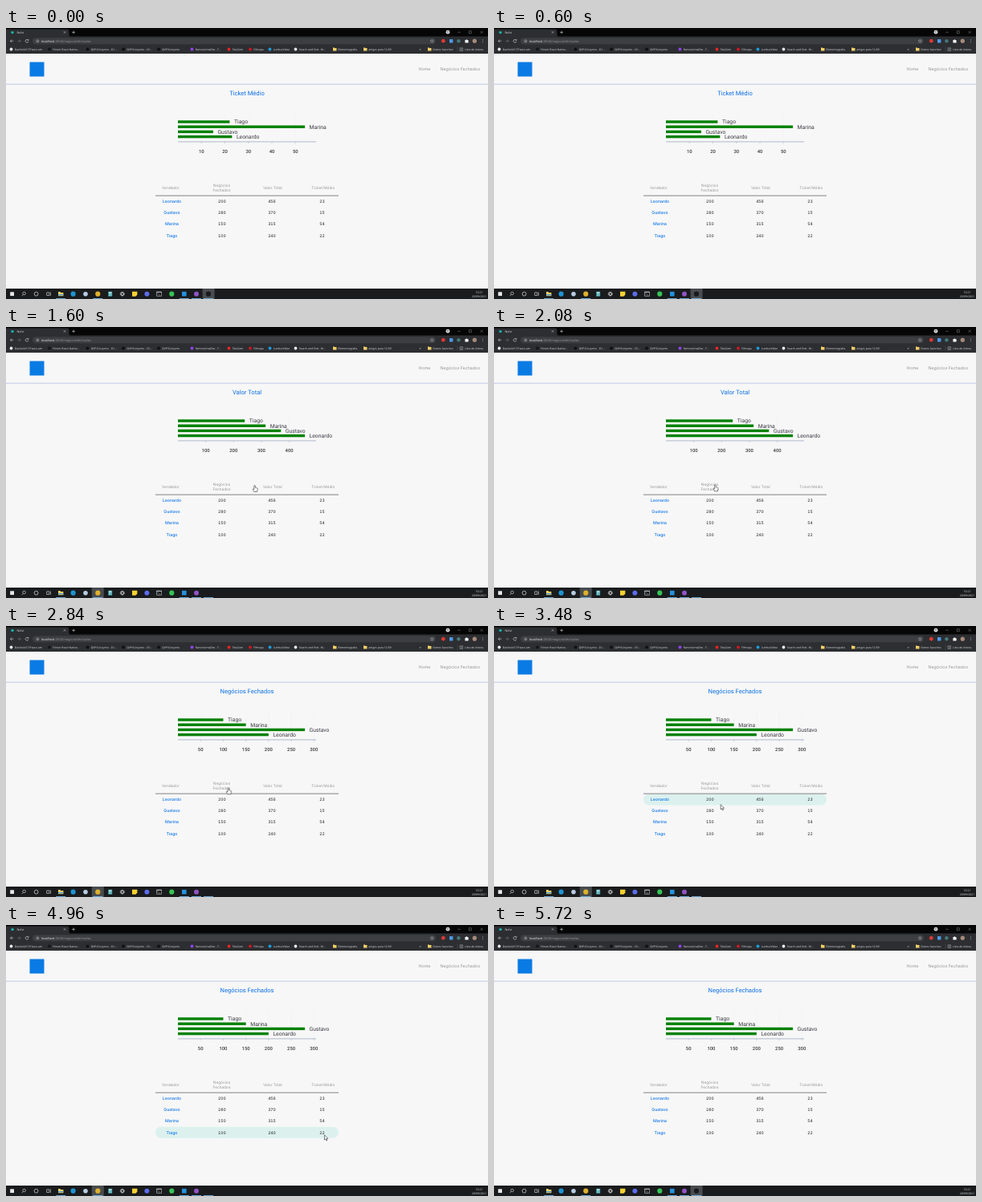
Write an HTML page that moves like this. It is 600x338 px and loops after 5760 ms.

```html
<!DOCTYPE html>
<html lang="pt-BR">
<head>
<meta charset="utf-8">
<title>Ticket Médio</title>
<style>
html, body { margin: 0; width: 100%; height: 100%; overflow: hidden; background: #f7f7f7; }
svg { display: block; width: 100vw; height: 100vh; }
text { text-rendering: geometricPrecision; }
.ui { font-family: "Open Sans", "Noto Sans", sans-serif; }
.page { font-family: Inter, Roboto, sans-serif; font-variant-numeric: tabular-nums; }
.plot { font-family: Roboto, "Open Sans", sans-serif; }
</style>
</head>
<body>
<svg id="stage" viewBox="0 0 600 338" preserveAspectRatio="none"></svg>
<script>
const LOOP = 5760;
const stage = document.getElementById("stage");

function el(parent, tag, attrs, content) {
  const node = document.createElementNS("http://www.w3.org/2000/svg", tag);
  for (const key in attrs) node.setAttribute(key, attrs[key]);
  if (content !== undefined) node.textContent = content;
  parent.appendChild(node);
  return node;
}
const group = (name, parent = stage) => el(parent, "g", { class: name });
const rect = (g, x, y, width, height, fill, rx = 0) => el(g, "rect", { x, y, width, height, fill, rx });
const dot = (g, cx, cy, r, fill) => el(g, "circle", { cx, cy, r, fill });
const line = (g, d, stroke, w = 0.7) => el(g, "path", { d, stroke, "stroke-width": w, fill: "none" });
const shape = (g, d, fill) => el(g, "path", { d, fill });
const label = (g, x, y, size, fill, str, anchor = "start", weight = 400) =>
  el(g, "text", { x, y, "font-size": size, fill, "text-anchor": anchor, "font-weight": weight }, str);
const show = (node, on) => node.setAttribute("visibility", on ? "visible" : "hidden");

const sellers = [
  { name: "Leonardo", deals: 200, total: 456, ticket: 23 },
  { name: "Gustavo", deals: 280, total: 370, ticket: 15 },
  { name: "Marina", deals: 150, total: 315, ticket: 54 },
  { name: "Tiago", deals: 100, total: 240, ticket: 22 }
];
const ROW_TOP = 209.4, ROW_H = 14.1, TABLE_L = 186, TABLE_R = 414;

function drawBrowser() {
  const g = group("ui");
  const pale = "#d6d7da";
  rect(g, 0, 0, 600, 11, "#060607");
  shape(g, "M0 11V1.6H76Q78.5 1.6 78.5 4V9Q78.5 10.5 80.5 11Z", "#2d2e31");
  rect(g, 0, 10.5, 600, 21.8, "#2d2e31");
  dot(g, 8, 5.6, 1.7, "#17b8b0");
  label(g, 13.5, 6.9, 3.7, "#e4e5e7", "Nolvi");
  line(g, "M71.8 4.2l2.4 2.4m0-2.4l-2.4 2.4", pale, 0.5);
  line(g, "M82.2 5.4h3.8m-1.9-1.9v3.8", pale, 0.6);
  dot(g, 550, 5.2, 2.4, "#dfe0e2");
  shape(g, "M548.9 4.5h2.2l-1.1 1.5z", "#222");
  line(g, "M562.3 5.3h3.4M576.3 3.7h3v3h-3zM590.5 3.7l3.2 3.2m0-3.2l-3.2 3.2", "#8c8e91", 0.5);

  line(g, "M9.3 16.2H5.4m1.8-1.8l-1.8 1.8 1.8 1.8", pale, 0.6);
  line(g, "M14.3 16.2h3.9m-1.8-1.8l1.8 1.8-1.8 1.8", "#777a7f", 0.6);
  line(g, "M27.5 15a1.9 1.9 0 1 0 .4 1.7m.1-2.8v1.4h-1.4", pale, 0.6);
  rect(g, 33, 12.3, 502, 8, "#3d3e41", 4);
  el(g, "circle", { cx: 39.3, cy: 16.3, r: 1.5, fill: "none", stroke: pale, "stroke-width": 0.5 });
  line(g, "M39.3 16v1.2", pale, 0.5);
  const url = label(g, 44, 17.7, 4, "#94979b", "");
  el(url, "tspan", { fill: "#f1f1f2" }, "localhost");
  el(url, "tspan", {}, ":3000/negociosfechados");
  line(g, "M530.3 14.2l.6 1.4 1.5.1-1.1 1 .3 1.5-1.3-.8-1.3.8.3-1.5-1.1-1 1.5-.1z", pale, 0.4);
  dot(g, 544.3, 16.2, 2.4, "#d83a35");
  rect(g, 552, 14, 4.4, 4.4, "#4c9ae8", 0.5);
  dot(g, 563.4, 16.2, 2.2, "#44797d");
  shape(g, "M571.4 15h1.2a.8.8 0 0 1 1.6 0h1.2v1.2a.8.8 0 0 1 0 1.5v.9h-4z", "#f3f3f4");
  dot(g, 583.3, 16.2, 2.6, "#a78b7d");
  for (const y of [14.5, 16.2, 17.9]) dot(g, 593.3, y, 0.45, pale);

  const event = "QVP/Conjunto";
  const bookmarks = [
    [6.5, "#e8e8e8", "Danilo4417/Passo-um"],
    [54, "#15181b", "Fórum React Native..."],
    [101.5, "#111", event + " - O l..."], [146, "#111", event + " - O l..."], [190, "#111", event],
    [231.5, "#8d45f2", "RamonLimaDev - T..."],
    [277.5, "#f02424", "TelaZum"],
    [304, "#d01820", "Filmopa"],
    [328.5, "#1b9de0", "Lumba Video"],
    [360.5, "#e9e9e9", "Search and find - M..."],
    [409, "folder", "Eletromiografia"],
    [447, "folder", "artigos para 12/09"],
    [527, "folder", "Outros favoritos"]
  ];
  for (const [x, color, str] of bookmarks) {
    if (color === "folder") shape(g, `M${x - 2} 24.4h1.7l.6.7h2.2v3.5h-4.5z`, "#f0cf68");
    else dot(g, x, 26.5, 1.9, color);
    label(g, x + 4.2, 27.7, 3.35, "#e2e3e5", str);
  }
  label(g, 514.5, 27.8, 4.5, pale, "»");
  line(g, "M522.6 23.8v5.6M562 23.8v5.6", "#55575b", 0.4);
  line(g, "M565 24.8h3.6v3.6h-3.6zM566 26h1.7m-1.7 1.2h1.7", pale, 0.4);
  label(g, 571.2, 27.7, 3.35, "#e2e3e5", "Lista de leitura");
}

function drawPage() {
  const g = group("page");
  rect(g, 0, 32, 600, 293, "#f7f7f7");
  rect(g, 0, 69.7, 600, 0.8, "#b3bde2");
  rect(g, 29.5, 42.5, 18, 18, "#0a7be4");
  label(g, 513.6, 53, 5.3, "#969699", "Home");
  label(g, 590, 53, 5.3, "#969699", "Negócios Fechados", "end");
}

// One chart per column, bars listed from the last seller to the first.
function drawChart(title, key, step) {
  const g = group("plot");
  const left = 214;
  const scale = 158 / Math.max(...sellers.map(s => s[key]));
  label(g, 300, 83.8, 7.6, "#0c70e4", title, "middle");
  for (let v = step; v * scale < 172; v += step) {
    const x = left + v * scale;
    line(g, `M${x} 107V142`, "#f1f1f3", 0.5);
    line(g, `M${x} 142v2.2`, "#a9b2c4", 0.5);
    label(g, x, 155.5, 5.9, "#3e3e44", v, "middle", 500);
  }
  line(g, "M214 141.9H386", "#9ca9bf", 0.8);
  [...sellers].reverse().forEach((s, i) => {
    const y = 117 + i * 6.2, w = s[key] * scale;
    rect(g, left, y - 1.7, w, 3.4, "green");
    label(g, left + w + 5.6, y + 2.4, 6.8, "#3a3a44", s.name);
  });
  return g;
}

function drawTable() {
  const g = group("page");
  const hover = rect(g, TABLE_L, 0, TABLE_R - TABLE_L, ROW_H, "#dcf1ed", 7);
  const head = (x, y, str) => label(g, x, y, 4.75, "#98989b", str, "middle");
  head(205, 200.8, "Vendedor");
  head(268.5, 197.6, "Negócios");
  head(268.5, 204.3, "Fechados");
  head(331.8, 200.8, "Valor Total");
  head(394.8, 200.8, "Ticket Médio");
  rect(g, TABLE_L, 208.7, TABLE_R - TABLE_L, 0.8, "#66666a");
  sellers.forEach((s, i) => {
    const y = 218.2 + i * ROW_H;
    label(g, 206.5, y, 5.2, "#0d75ea", s.name, "middle", 500);
    label(g, 268.8, y, 5, "#3b3b3f", s.deals, "middle", 500);
    label(g, 331, y, 5, "#3b3b3f", s.total, "middle", 500);
    label(g, 393.4, y, 5, "#3b3b3f", s.ticket, "middle", 500);
  });
  return hover;
}

function drawTaskbar() {
  const g = group("ui");
  const pale = "#e8e9ea";
  rect(g, 0, 325, 600, 13, "#191b1d");
  const focus = rect(g, 0, 325, 15, 13, "#484c4f");
  rect(g, 5.2, 329.3, 4.8, 4.8, pale);
  el(g, "circle", { cx: 22.6, cy: 331, r: 1.8, fill: "none", stroke: pale, "stroke-width": 0.6 });
  line(g, "M21.3 332.4l-1.7 1.8", pale, 0.6);
  el(g, "circle", { cx: 37.6, cy: 331.7, r: 2.4, fill: "none", stroke: pale, "stroke-width": 0.7 });
  line(g, "M50.7 329.9h3.2v3.6h-3.2zM55.4 329.4v4.6", pale, 0.6);
  shape(g, "M65 329h2.4l.8.9h3.2v4.4H65z", "#f4cf61");
  rect(g, 65, 332, 6.4, 1.4, "#4aa0de");
  dot(g, 83.6, 331.7, 3.1, "#1f93d2");
  dot(g, 99, 331.7, 2.8, "#b9cbe0");
  dot(g, 114.3, 331.7, 3.1, "#dfb02f");
  rect(g, 127.2, 328.7, 5, 6, "#3f9fa9", 0.5);
  rect(g, 128, 329.4, 3.4, 1.2, "#e1f2f4");
  for (let i = 0; i < 6; i++) rect(g, 128 + i % 3 * 1.3, 331.4 + (i > 2) * 1.4, 0.8, 0.8, "#e1f2f4");
  el(g, "circle", { cx: 144.8, cy: 331.7, r: 1.7, fill: "none", stroke: pale, "stroke-width": 1 });
  el(g, "circle", { cx: 144.8, cy: 331.7, r: 2.6, fill: "none", stroke: pale,
    "stroke-width": 0.8, "stroke-dasharray": "1.02 1.02" });
  shape(g, "M157 328.8h6.4v4l-2 2H157z", "#f6d132");
  dot(g, 175.4, 331.7, 3, "#5c6cec");
  rect(g, 187.3, 328.8, 6.6, 5.6, "#d5d7d9", 0.4);
  rect(g, 187.8, 329.8, 5.6, 4.1, "#15181a");
  line(g, "M188.5 330.6l1 .9-1 .9m1.6.4h1.6", "#fff", 0.4);
  dot(g, 206.3, 331.7, 3.1, "#35c454");
  rect(g, 219, 328.9, 5.6, 5.6, "#2492dd");
  dot(g, 237, 331.7, 3, "#9252c7");
  dot(g, 252, 331.7, 3.1, "#191a1d");
  for (const x of [68.2, 114.3, 221.8, 237, 252]) rect(g, x - 6, 337.1, 12, 0.9, "#76b4e4");
  label(g, 589, 330.5, 3.5, pale, "10:21", "middle");
  label(g, 589, 336.2, 3.5, pale, "20/09/2021", "middle");
  return focus;
}

drawBrowser();
drawPage();
const charts = [
  drawChart("Ticket Médio", "ticket", 10),
  drawChart("Valor Total", "total", 100),
  drawChart("Negócios Fechados", "deals", 50)
];
const hover = drawTable();
const focus = drawTaskbar();

const pointer = group("pointer");
const outline = { fill: "#fff", stroke: "#2b2b2e", "stroke-width": 0.6, "stroke-linejoin": "round" };
const arrow = el(pointer, "path", { ...outline, d: "M0 0V6.2L1.4 4.9 2.4 7.2 3.4 6.8 2.5 4.6H4.4Z" });
const hand = el(pointer, "path", { ...outline,
  d: "M-.7 .6Q0-.5.7.6V3L3 3.6Q3.9 4 3.6 5.3L3 8.2H-.7L-2.5 5.2Q-2.2 4.2-.7 5.1Z" });

// Pointer stops: time, x, y
const path = [
  [640, 548, 320], [1000, 334.4, 197.8], [1440, 334.4, 197.8],
  [1800, 275.4, 196.6], [2700, 275.4, 196.6], [3200, 282.2, 222.6],
  [3520, 282.2, 222.6], [3680, 284, 229], [3880, 286, 232],
  [4040, 289.6, 241], [4120, 289.6, 241], [4320, 300, 256],
  [4520, 306, 257], [4840, 396.4, 261.8], [4960, 396.4, 261.8],
  [5060, 546, 332]
];

function pointerAt(t) {
  const i = path.findIndex(p => p[0] > t);
  if (i < 1) return null;
  const [t0, x0, y0] = path[i - 1], [t1, x1, y1] = path[i];
  const u = (t - t0) / (t1 - t0), k = u * u * (3 - 2 * u);
  return [x0 + (x1 - x0) * k, y0 + (y1 - y0) * k];
}

function draw(t) {
  const current = t < 1360 ? 0 : t < 2440 ? 1 : 2;
  charts.forEach((g, i) => show(g, i === current));
  focus.setAttribute("x", t >= 1360 && t < 5720 ? 106.8 : 244.6);

  const pos = pointerAt(t);
  show(arrow, false);
  show(hand, false);
  show(hover, false);
  if (!pos) return;
  const [x, y] = pos;
  const inside = x > TABLE_L && x < TABLE_R;
  const onHead = inside && y > 190 && y < ROW_TOP;
  const row = Math.floor((y - ROW_TOP) / ROW_H);
  pointer.setAttribute("transform", `translate(${x} ${y})`);
  show(onHead ? hand : arrow, true);
  if (inside && row >= 0 && row < sellers.length) {
    hover.setAttribute("y", ROW_TOP + row * ROW_H);
    show(hover, true);
  }
}

const start = performance.now();
function tick() {
  draw((performance.now() - start) % LOOP);
  requestAnimationFrame(tick);
}
tick();
</script>
</body>
</html>
```
